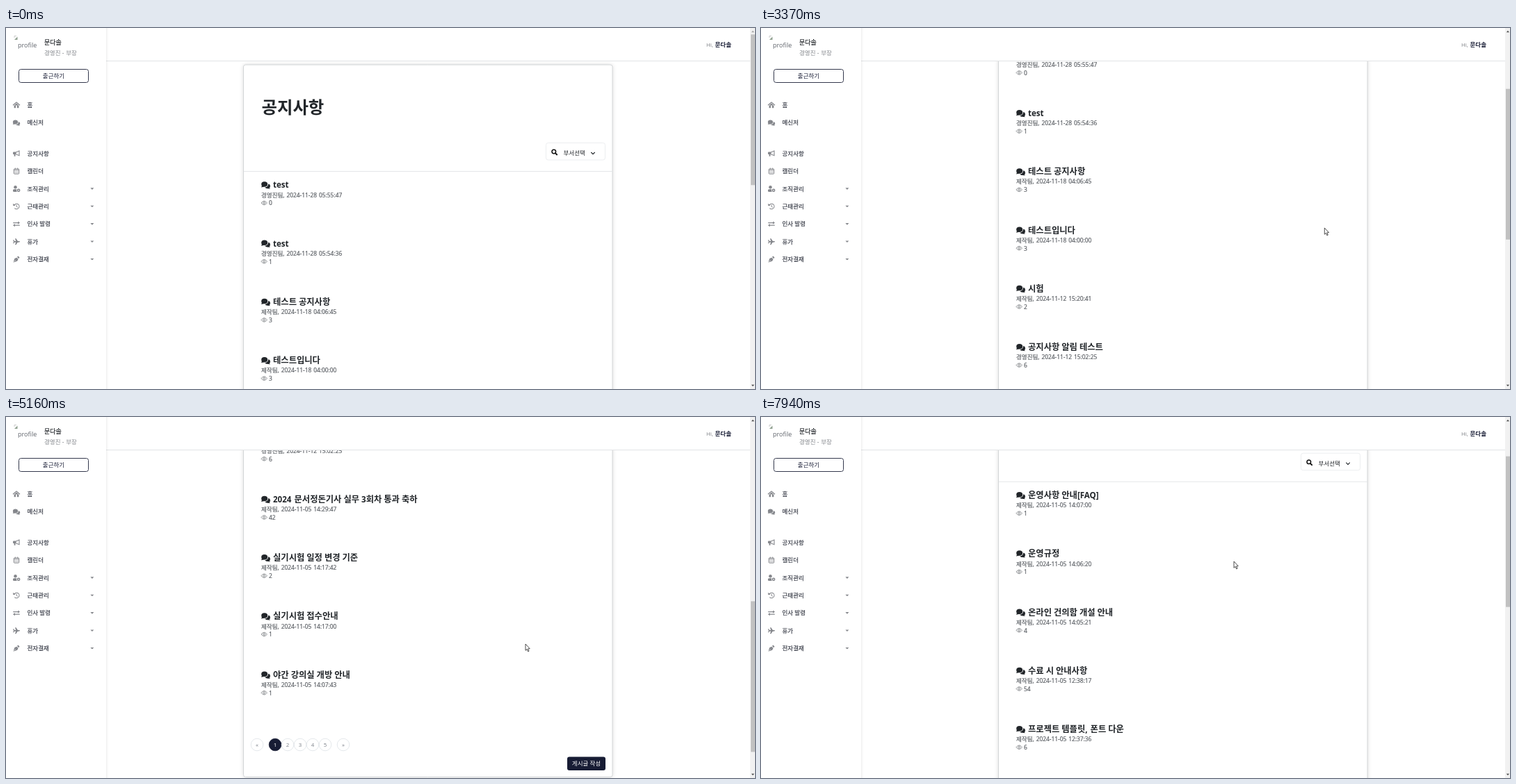
These frames come from a looping animation (1077 px wide and 520 px high, 8 s). An HTML page with a canvas:

```html
<!DOCTYPE html>
<html lang="ko">
<head>
<meta charset="utf-8">
<title>공지사항</title>
<style>
html, body { margin: 0; width: 100%; height: 100%; overflow: hidden; background: #fff; }
canvas { display: block; width: 1077px; height: 520px; }
</style>
</head>
<body>
<canvas id="stage"></canvas>
<script>
const W = 1077, H = 520, LOOP = 8000;
const INK = '#212529', NAVY = '#171c34', GRAY = '#85878c', META = '#5f6368', LABEL = '#393d48';
const USER = '문다솔', MAKERS = '제작팀', MANAGERS = '경영진팀';
const ROW = 84.25, MENU_ROW = 25.4;
const canvas = document.getElementById('stage');
const ctx = canvas.getContext('2d');
const ratio = window.devicePixelRatio || 1;
canvas.width = W * ratio;
canvas.height = H * ratio;

const MENU = [
  ['홈', home], ['메신저', bubbles], ['공지사항', horn], ['캘린더', calendar], ['조직관리', person],
  ['근태관리', history], ['인사 발령', swap], ['휴가', plane], ['전자결재', pen]
];
const PAGE_ONE = [
  ['test', MANAGERS, '11-28 05:55:47', 0],
  ['test', MANAGERS, '11-28 05:54:36', 1],
  ['테스트 공지사항', MAKERS, '11-18 04:06:45', 3],
  ['테스트입니다', MAKERS, '11-18 04:00:00', 3],
  ['시험', MAKERS, '11-12 15:20:41', 2],
  ['공지사항 알림 테스트', MANAGERS, '11-12 15:02:25', 6],
  ['2024 문서정돈기사 실무 3회차 통과 축하', MAKERS, '11-05 14:29:47', 42],
  ['실기시험 일정 변경 기준', MAKERS, '11-05 14:17:42', 2],
  ['실기시험 접수안내', MAKERS, '11-05 14:17:00', 1],
  ['야간 강의실 개방 안내', MAKERS, '11-05 14:07:43', 1]
];
const PAGE_TWO = [
  ['운영사항 안내[FAQ]', MAKERS, '11-05 14:07:00', 1],
  ['운영규정', MAKERS, '11-05 14:06:20', 1],
  ['온라인 건의함 개설 안내', MAKERS, '11-05 14:05:21', 4],
  ['수료 시 안내사항', MAKERS, '11-05 12:38:17', 54],
  ['프로젝트 템플릿, 폰트 다운', MAKERS, '11-05 12:37:36', 6]
];

// Key points: time, then values
const SCROLL_ONE = [[2460, 0], [3040, 114.3], [3300, 168], [3500, 224], [3690, 224], [3890, 323],
  [4400, 449], [4520, 449], [5160, 613], [5300, 682]];
const SCROLL_TWO = [[7300, 0], [7890, 113.3]];
const POINTER = [[1490, 1072, 514], [2200, 911, 254], [2460, 911, 254], [3040, 820, 279],
  [3890, 795, 302], [5160, 747, 327], [5370, 747, 327], [5860, 333, 399], [6140, 404, 405],
  [7100, 404, 405], [7940, 680, 208]];
const BLANK_FROM = 6720, BLANK_TO = 6940;

function sample(keys, t, col = 1) {
  const next = keys.findIndex(k => k[0] >= t);
  if (next < 0) return keys[keys.length - 1][col];
  const b = keys[next], a = keys[next - 1] || b;
  return a === b ? b[col] : a[col] + (b[col] - a[col]) * (t - a[0]) / (b[0] - a[0]);
}

// y is the middle of the line; Latin runs are set smaller than Hangul
function text(str, x, y, size, color, weight = 400, align = 'left') {
  ctx.wordSpacing = size * 0.09 + 'px';
  const bold = weight > 500;
  const runs = String(str).split(/([\uac00-\ud7a3]+)/).filter(Boolean).map(s => {
    const latin = !/[\uac00-\ud7a3]/.test(s);
    const px = latin ? size * (bold ? 0.94 : 0.985) : size;
    const font = `${latin && bold ? 600 : weight} ${px}px "Noto Sans", "Noto Sans CJK KR", "Noto Sans CJK", sans-serif`;
    ctx.font = font;
    return { s, font, w: ctx.measureText(s).width };
  });
  if (align === 'center') x -= runs.reduce((sum, r) => sum + r.w, 0) / 2;
  ctx.fillStyle = ctx.strokeStyle = color;
  ctx.lineWidth = 0.2;
  for (const r of runs) {
    ctx.font = r.font;
    ctx.fillText(r.s, x, y + size * 0.36);
    if (weight === 500) ctx.strokeText(r.s, x, y + size * 0.36);
    x += r.w;
  }
}

function box(x, y, w, h, r, fill, stroke) {
  ctx.beginPath();
  ctx.roundRect(x, y, w, h, r);
  paint(fill, stroke, 1);
}

function paint(fill, stroke, width) {
  if (fill) { ctx.fillStyle = fill; ctx.fill(); }
  if (stroke) { ctx.strokeStyle = stroke; ctx.lineWidth = width; ctx.stroke(); }
}

function rect(x, y, w, h, color) {
  ctx.fillStyle = color;
  ctx.fillRect(x, y, w, h);
}

function trace(pts) {
  ctx.beginPath();
  for (let i = 0; i < pts.length; i += 2) ctx.lineTo(pts[i], pts[i + 1]);
}

function poly(pts, fill, stroke) {
  trace(pts);
  ctx.closePath();
  paint(fill, stroke, 0.8);
}

function line(pts, color, width = 1) {
  trace(pts);
  paint(null, color, width);
}

// Triangle pointing down, or up when h is negative
function caret(x, y, w, h, color) {
  poly([x - w, y - h, x + w, y - h, x, y + h], color);
}

function disc(x, y, rx, color, ry = rx) {
  ctx.beginPath();
  ctx.ellipse(x, y, rx, ry, 0, 0, 7);
  paint(color);
}

function ring(x, y, r, color, width = 1, from = 0, to = 7) {
  ctx.beginPath();
  ctx.arc(x, y, r, from, to);
  paint(null, color, width);
}

function at(x, y, scale, draw, color) {
  ctx.save();
  ctx.translate(x, y);
  ctx.scale(scale, scale);
  draw(color);
  ctx.restore();
}

// Icons, about 10 units wide around the centre
function home(c) {
  line([-5, 0.3, 0, -4, 5, 0.3], c, 1.2);
  caret(0, -1, 3.4, -1.6, c);
  for (const x of [-3.4, 1]) rect(x, 0.5, 2.4, 3.7, c);
}

function bubbles(c) {
  disc(2, 1.2, 3.2, c, 2.7);
  poly([3.2, 2.4, 5.2, 4.3, 1.6, 3.8], c);
  disc(-1.4, -0.9, 4.2, '#fff', 3.5);
  disc(-1.5, -1, 3.6, c, 3);
  poly([-4.2, 0, -5.2, 2.6, -1.5, 1.8], c);
}

function horn(c) {
  line([-0.8, -1.7, 4, -3.7, 4, 2.9, -0.8, 0.9], c, 1.1);
  box(-5, -2.2, 4.6, 3.4, 1, c);
  rect(-3.4, 0.8, 1.9, 3.2, c);
}

function calendar(c) {
  box(-3.7, -3.2, 7.4, 7.2, 0.8, null, c);
  rect(-3.7, -1.9, 7.4, 0.9, c);
  for (const x of [-2.2, 1.2]) rect(x, -4.7, 1, 2, c);
  for (let i = 0; i < 6; i++) rect(-2.4 + i % 3 * 1.9, i < 3 ? 0 : 1.8, 1, 1, c);
}

function person(c) {
  disc(-1.5, -2.3, 2.3, c);
  box(-5, 0.6, 6.6, 3.8, 1.5, c);
  disc(3.1, 2.2, 3, '#fff');
  ring(3.1, 2.2, 1.6, c, 1.5);
}

function history(c) {
  ring(0.2, 0, 3.8, c, 1.1, -2.7, 2.4);
  poly([-4.8, -4.2, -4.8, -0.9, -1.5, -0.9], c);
  line([0.2, -2.2, 0.2, 0.3, 1.8, 1.4], c);
}

function swap(c) {
  for (const s of [1, -1]) {
    line([-4.8 * s, -1.8 * s, 3 * s, -1.8 * s], c, 1.2);
    poly([2.2 * s, -3.9 * s, 5 * s, -1.8 * s, 2.2 * s, 0.3 * s], c);
  }
}

function plane(c) {
  disc(0.4, 0, 4.7, c, 1);
  for (const s of [1, -1]) {
    poly([-0.5, 0, -2, 4.5 * s, -0.5, 4.5 * s, 2.4, 0], c);
    line([-3, 0, -4.5, 2.4 * s], c, 1.2);
  }
}

function pen(c) {
  line([2, -2.2, 3.6, -3.6], c, 3);
  poly([0.4, -2.4, 2.6, -0.2, 1.2, 2.6, -4.6, 4.6, -2.6, -1.2], c);
  line([-4.2, 4.2, -1, 1], '#fff', 0.6);
}

function search(c) {
  ring(-0.9, -0.9, 2.8, c, 1.5);
  line([1.1, 1.1, 4, 4], c, 1.9);
}

function eye(c) {
  ctx.beginPath();
  ctx.moveTo(-4.2, 0);
  ctx.quadraticCurveTo(0, -5.6, 4.2, 0);
  ctx.quadraticCurveTo(0, 5.6, -4.2, 0);
  paint(null, c, 0.7);
  ring(0, 0, 1.4, c, 0.7);
}

function shadowed(blur, alpha, draw) {
  ctx.save();
  ctx.shadowColor = `rgba(0,0,0,${alpha})`;
  ctx.shadowBlur = blur * ratio;
  draw();
  ctx.restore();
}

function button(label, y) {
  box(18.5, y - 9.5, 100, 19, 3, '#fff', '#34384c');
  text(label, 68.5, y, 8.5, NAVY, 400, 'center');
}

function sidebar(loading) {
  shadowed(4, 0.13, () => rect(-10, -10, 154, H + 20, '#fff'));
  line([12, 14, 12, 11.5, 15, 11.5], '#b5b5b5', 0.7);
  poly([12, 17, 16.5, 12.5, 16.5, 17], '#8fa08f');
  text('profile', 17, 25, 9.2, '#6b6f76');
  text(USER, 55, 21, 9, INK, 500);
  text('경영진 - 부장', 55, 36, 8.5, '#85888d');
  button('출근하기', 69);
  if (loading) button('퇴근하기', 92);

  const rows = loading ? MENU.slice(0, 2) : MENU;
  rows.forEach(([label, icon], i) => {
    const y = 111 + i * MENU_ROW + (i > 1 ? 19 : 0) + (loading ? 22.5 : 0);
    text(label, 30.5, y, 8.5, LABEL, 500);
    if (!loading) at(15, y, 1, icon, GRAY);
    if (i > 3) caret(123.9, y, 2.5, 1.3, GRAY);
  });
}

function header() {
  rect(144, 0, 926, 47, '#fff');
  rect(144, 47, 926, 1, '#e2e4e6');
  text('Hi,', 1007, 24, 7.9, GRAY);
  text(USER, 1019.5, 24, 8.5, NAVY, 700);
}

function scrollbar(offset) {
  rect(1070, 0, 7, H, '#f1f1f1');
  rect(1071, 9.3 + offset * 0.4178, 6, 217, '#c1c1c1');
  caret(1073.9, 5, 2.1, -1.2, offset ? '#505050' : '#a3a3a3');
  caret(1073.9, H - 5, 2.1, 1.2, '#505050');
}

function pageLink(label, x, active) {
  ctx.beginPath();
  ctx.arc(x, 1085, 8.8, 0, 7);
  paint(active ? NAVY : '#fff', active ? NAVY : '#dee2e6', 0.8);
  text(label, x, 1085, 8, active ? '#fff' : '#81868e', 400, 'center');
}

function post([title, team, date, views], i) {
  const y = 226 + i * ROW;
  at(373.5, y + 0.3, 1.24, bubbles, INK);
  text(title, 384, y, 12.3, INK, 700);
  text(`${team}, 2024-${date}`, 367, y + 14.5, 8.5, META, 500);
  at(371.2, y + 26, 1, eye, META);
  text(views, 378, y + 26.4, 8.5, META, 500);
}

function board(posts, offset, page) {
  ctx.save();
  ctx.beginPath();
  ctx.rect(144, 48, 926, H - 48);
  ctx.clip();
  ctx.translate(0, -offset);

  shadowed(6, 0.16, () => box(341.5, 53, 530.5, 1078.5, 3, '#fff'));
  box(341.5, 53, 530.5, 1078.5, 3, null, '#d3d6d8');
  text('공지사항', 367.5, 114, 24.4, INK, 700);
  box(776.5, 165.5, 85, 24.5, 3, '#fff', '#eceef0');
  at(788.7, 179, 1, search, '#111');
  text('부서선택', 801.5, 180.3, 8.5, INK);
  line([841.3, 179, 844, 181.7, 846.7, 179], INK, 1.1);
  rect(342, 206, 530, 1, '#e4e6e8');

  posts.forEach(post);

  pageLink('«', 361);
  for (let n = 1; n <= 5; n++) pageLink(n, 369 + n * 18, n === page);
  pageLink('»', 485);
  box(807, 1102.5, 55, 19.5, 3, NAVY);
  text('게시글 작성', 834.5, 1112, 8.5, '#fff', 400, 'center');
  ctx.restore();
}

function arrow(x, y) {
  at(x, y, 1, () => poly([0, 0, 0, 9.3, 2.1, 7.4, 3.5, 10.8, 5, 10.2, 3.6, 6.9, 6.2, 6.7], '#fff', '#222'));
}

function beam(x, y) {
  line([x, y - 4.5, x, y + 4.5], '#222', 0.9);
  for (const end of [-4.5, 4.5]) line([x - 2.3, y + end, x + 2.3, y + end], '#222', 0.8);
}

function pointer(t) {
  if (t >= 1110 && t < 1180) arrow(1060, 516);
  if (t < POINTER[0][0]) return;
  const draw = t > 6080 && t < 7100 ? beam : arrow;
  draw(sample(POINTER, t, 1), sample(POINTER, t, 2));
}

function render(now) {
  const t = now % LOOP;
  ctx.setTransform(ratio, 0, 0, ratio, 0, 0);
  rect(0, 0, W, H, '#fff');
  const loading = t >= BLANK_FROM && t < BLANK_TO;
  if (!loading) {
    const second = t >= BLANK_TO;
    const offset = sample(second ? SCROLL_TWO : SCROLL_ONE, t);
    board(second ? PAGE_TWO : PAGE_ONE, offset, second ? 2 : 1);
    header();
    scrollbar(offset);
  }
  sidebar(loading);
  pointer(t);
}

let start;
function tick(now) {
  start ??= now;
  render(Math.max(0, now - start));
  requestAnimationFrame(tick);
}
render(0);
requestAnimationFrame(tick);
</script>
</body>
</html>
```
